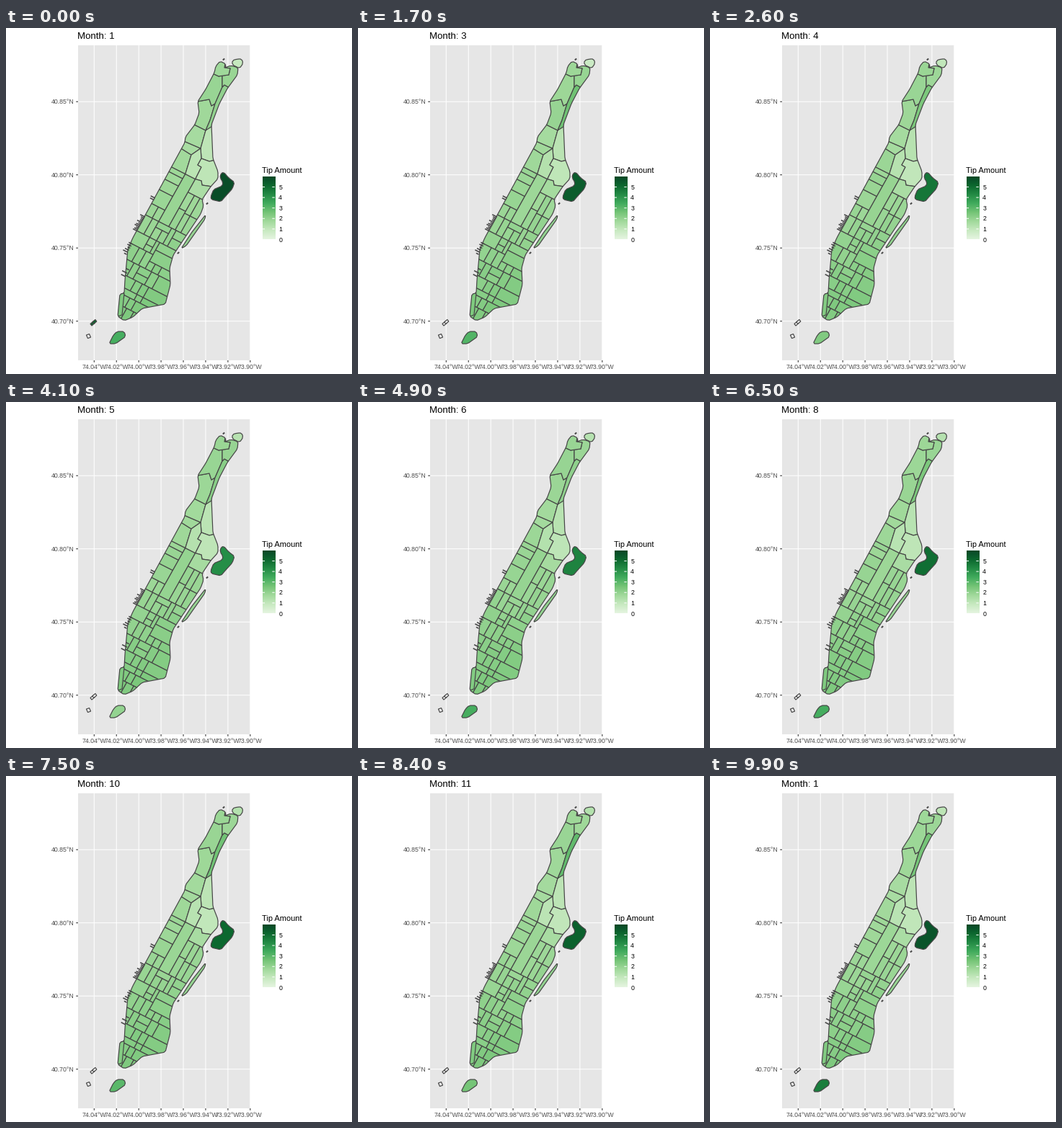
Recreate the animation shown at these times as a matplotlib script. Size 480 px wide and 480 px high, loop 10 s.

```python
from itertools import pairwise

import numpy as np
import matplotlib.pyplot as plt
from matplotlib.animation import FuncAnimation
from matplotlib.colors import to_rgb
from matplotlib.patches import Polygon, Rectangle

SIZE = 480
PT = 0.72  # points per pixel at 100 dpi
INK = "#464646"
MONTHS = np.arange(1, 13)

plt.rcParams["font.family"] = "Liberation Sans"
fig = plt.figure(figsize=(4.8, 4.8), dpi=100, facecolor="white")
ax = fig.add_axes([0, 0, 1, 1])
ax.axis("off")

# ---------- colour scale ----------
GREENS = np.array([to_rgb(c) for c in (
    "#E5F5E0", "#C7E9C0", "#A1D99B", "#74C476",
    "#41AB5D", "#238B45", "#0C682F", "#084827")])
TOP = 5.93


def shade(value):
    if np.isnan(value):
        return (0.97, 0.97, 0.97)
    stops = np.linspace(0, TOP, len(GREENS))
    return tuple(np.interp(value, stops, channel) for channel in GREENS.T)


# ---------- panel, axes, legend ----------
def line(x0, y0, x1, y1, color, width=1.07, z=1):
    ax.plot([x0, x1], [y0, y1], color=color, lw=width * PT, zorder=z,
            solid_capstyle="butt", snap=False)


def text(x, y, s, size, color="black", ha="left"):
    return ax.text(x, y, s, fontsize=size * PT, color=color, ha=ha,
                   va="baseline")


ax.add_patch(Rectangle((100, 23.5), 239, 437.5, fc="#E6E6E6", ec="none", zorder=0))
for k in range(8):
    x = 122.3 + 30.93 * k
    line(x, 23.5, x, 461, "white")
    line(x, 461, x, 463.8, "#333333")
    text(x, 473, f"{74.04 - 0.02 * k:.2f}°W", 8.8, "#4D4D4D", "center")
for k in range(4):
    y = 102.2 + 101.5 * k
    line(100, y, 339, y, "white")
    line(97.2, y, 100, y, "#333333")
    text(95, y + 3.2, f"{40.85 - 0.05 * k:.2f}°N", 8.8, "#4D4D4D", "right")

text(355, 201, "Tip Amount", 11)
ramp = np.array([[shade(v)] for v in np.linspace(TOP, 0, 174)])
ax.imshow(ramp, extent=(355.5, 372.8, 293.4, 207), aspect="auto", zorder=2)
for v in range(6):
    y = 293.4 - 14.57 * v
    line(355.5, y, 359, y, "white", 1, 3)
    line(369.3, y, 372.8, y, "white", 1, 3)
    text(378.2, y + 3.2, str(v), 8.8)
title = text(99, 15, "Month: 1", 13.2)
ax.set_xlim(0, SIZE)
ax.set_ylim(SIZE, 0)


# ---------- geometry helpers ----------
def grid(street, avenue):
    """Pixel position in the slanted street grid."""
    s = street - 59
    return 225.7 + 0.725 * s + 13.9 * avenue, 275.6 - 1.294 * s + 7.1 * avenue


def rounded(points, radius=2.0):
    """Cut each corner of a closed shape at a small fixed distance."""
    p = np.array(points, float)
    out = []
    for prev, here, nxt in zip(np.roll(p, 1, 0), p, np.roll(p, -1, 0)):
        for other in (prev, nxt):
            step = other - here
            out.append(here + step * min(0.3, radius / np.hypot(*step)))
    return out


def outline(points, **style):
    return ax.add_patch(Polygon(points, closed=True, ec=INK, lw=1.2 * PT,
                                joinstyle="round", **style))


# ---------- zones ----------
shore = rounded([
    (289, 62), (291, 53), (297, 46), (305, 50), (304, 55), (312, 52), (322, 55),
    (321, 65), (307, 84), (296, 105), (285, 134), (287, 181), (294, 199), (294, 209),
    (284, 220), (272, 238), (274, 247), (270, 258), (232, 315), (227, 333), (228, 356),
    (221, 383), (189, 389), (176, 401), (164, 406), (155, 400), (158, 369), (164, 368),
    (165, 350), (169, 307), (176, 291), (248, 159), (249, 151), (262, 134), (268, 118),
    (266, 102), (277, 85)])
coast = outline(shore, fc="none", zorder=5)
rng = np.random.default_rng(7)
zones = []


def usual(x, y):
    """Typical tips: higher towards the south, a dip in the north-east."""
    south = 0.5 * np.clip((y - 260) / 130, 0, 1)
    dip = np.exp(-((x - 282) / 26) ** 2 - ((y - 185) / 35) ** 2)
    season = 0.07 * np.sin(np.pi * MONTHS / 12)
    return 1.78 + south - dip + season + rng.uniform(-0.08, 0.08, 12)


def zone(points, keys=None, island=False):
    """Add an area; keys maps some months to values, the rest is interpolated."""
    if keys:
        values = np.interp(MONTHS, list(keys), list(keys.values()), right=np.nan)
    else:
        values = usual(*np.mean(points, axis=0))
    patch = outline(points, zorder=4)
    if not island:
        patch.set_clip_path(coast)
    zones.append((patch, values))


def blocks(streets, avenues):
    for s0, s1 in pairwise(streets):
        for a0, a1 in pairwise(avenues):
            zone([grid(s0, a0), grid(s1, a0), grid(s1, a1), grid(s0, a1)])


W, E = -3, 3.4  # beyond either shore

# street grid, from the park down to the southern tip
blocks((71, 86, 97, 105, 110), (W, -1))
blocks((59, 71), (W, -1.65, -1))
blocks((59, 110), (-1, 0))
blocks((59, 79, 96), (0, 0.65))
blocks((59, 77, 96), (0.65, 1.2, E))
blocks((42, 59), (W, -1.6, -1))
blocks((53, 59), (-1, 0.3))
blocks((42, 53), (-1, -0.33, 0.3))
blocks((42, 59), (0.3, 0.75))
blocks((42, 51, 59), (0.75, E))
blocks((29, 42), (W, -1))
blocks((29, 35, 42), (-1, -0.33))
blocks((29, 42), (-0.33, 0))
blocks((22, 34, 42), (0, E))
blocks((14, 29), (W, -1.35, -0.66, 0))
blocks((14, 22), (0, 0.6, 1.25, E))
blocks((0, 14), (W, -1.1, -0.5))
blocks((0, 7, 14), (-0.5, 0.65))
blocks((0, 14), (0.65, 1.4, E))
blocks((-11, 0), (W, -0.2, 0.45, 1.1, E))
blocks((-17, -11), (W, 0.5, 1.1, E))
blocks((-27, -17), (W, 0.1, 0.7, E))
blocks((-44, -27), (W, 0.3, 1, E))
zone([(150, 368), (164, 368), (161, 398), (150, 402)])

# the north, where the grid ends
park_w, park_e = grid(110, -1), grid(110, 0)
zone([(225, 190.5), (238, 164), (257, 176), park_w])
zone([(238, 164), (240, 154), (270, 167), (257, 176)])
zone([(240, 154), (255, 131), (277, 142), (270, 167)])
zone([(277, 142), (295, 125), (300, 181), (282, 185), (271, 181), (270, 167)])
zone([park_w, (257, 176), (270, 167), (271, 181), (266, 190), (271, 193), park_e])
zone([park_e, (271, 193), (266, 190), (271, 181), (282, 185), (300, 181), (300, 222),
      (272, 218), (271, 212)])
zone([park_e, (271, 212), (272, 218), (300, 222), grid(96, E), grid(96, 0)])
zone([(255, 131), (260, 103), (282, 99), (285, 108), (290, 105), (283, 128), (277, 142)])
zone([(260, 103), (280, 60), (295, 67), (300, 66), (300, 82), (290, 105), (285, 108), (282, 99)])
zone([(277, 142), (283, 128), (290, 105), (300, 82), (303, 79), (312, 84), (285, 137)],
     {1: 2.0, 3: 2.6, 6: 2.0, 12: 3.0})
zone([(300, 82), (300, 66), (309, 65), (311, 56), (303, 55), (320, 45), (330, 60),
      (312, 84), (303, 79)])
zone([(280, 60), (290, 40), (306, 40), (303, 55), (311, 56), (309, 65), (295, 67)])
zone(rounded([(314, 45), (321, 43), (327, 43), (329, 49), (324, 56), (314, 51)]),
     {1: 0.9, 3: 0.75, 5: 1.2, 12: 1.3}, island=True)

# islands
zone(rounded([(298, 202), (302, 200), (309, 208), (317, 214), (314, 223), (304, 234),
              (298, 241), (285, 238), (284, 234), (288, 224), (300, 219), (301, 214),
              (297, 208)]),
     {1: 5.8, 3: 5.4, 5: 4.1, 8: 4.9, 12: 5.4}, island=True)
zone(rounded([(277, 259), (276, 265), (250, 302), (243, 306), (258, 283)]), island=True)
zone(rounded([(143, 438), (149, 426), (154, 421), (164, 421), (166, 428), (152, 438)]),
     {1: 3.3, 3: 3.1, 5: 1.5, 6: 3.3, 8: 3.4, 11: 2.5, 12: 5.8}, island=True)


def islet(x, y, w, h, keys):
    zone([(x - w, y + h), (x + 1, y - w), (x + w, y - h), (x - 1, y + w)], keys, island=True)


islet(120, 410, 3, 0.5, {1: 5.1})
islet(122.8, 407.5, 3, 0.5, {1: 5.1})
islet(114.5, 427.5, 3, -1.5, {0: 0})  # no data at all


# piers and rocks along the shore
def piers(first, last, count, shore_at):
    for s, reach in zip(np.linspace(first, last, count), rng.uniform(0.25, 0.5, count)):
        line(*grid(s, shore_at), *grid(s, shore_at - reach), INK, 1.6, 4)


piers(42, 57, 11, -2.25)
piers(18, 29, 6, -2.05)
piers(75, 77, 2, -2.3)
piers(-1, 6, 3, -1.2)
for x, y in ((302, 43.5), (239, 312), (279, 243.5)):
    line(x - 1.2, y + 1, x + 1.2, y - 1, INK, 2, 4)

# ---------- motion ----------
# a transition starts every 9 ticks at first, every 8 later, and takes 3
STARTS = np.cumsum([5] + [9] * 4 + [8] * 7)


def phase(i):
    """Month index and progress towards the next month."""
    k = int(np.sum(STARTS <= i)) - 1
    if k < 0:
        return 0, 0.0
    step = i - STARTS[k]
    if step >= 3:
        return k + 1, 0.0
    return k, 0.5 if step == 2 else 0.25


def update(i):
    k, part = phase(i)
    nxt = (k + 1) % 12
    for patch, values in zones:
        a, b = values[k], values[nxt]
        missing = np.isnan(a) or np.isnan(b)
        patch.set_facecolor(shade(a if missing else a + (b - a) * part))
    title.set_text(f"Month: {(nxt if part >= 0.5 else k) + 1}")
    return [title] + [patch for patch, _ in zones]


anim = FuncAnimation(fig, update, frames=100, interval=100, repeat=True,
                     repeat_delay=0, init_func=lambda: update(0))
plt.show()
```
